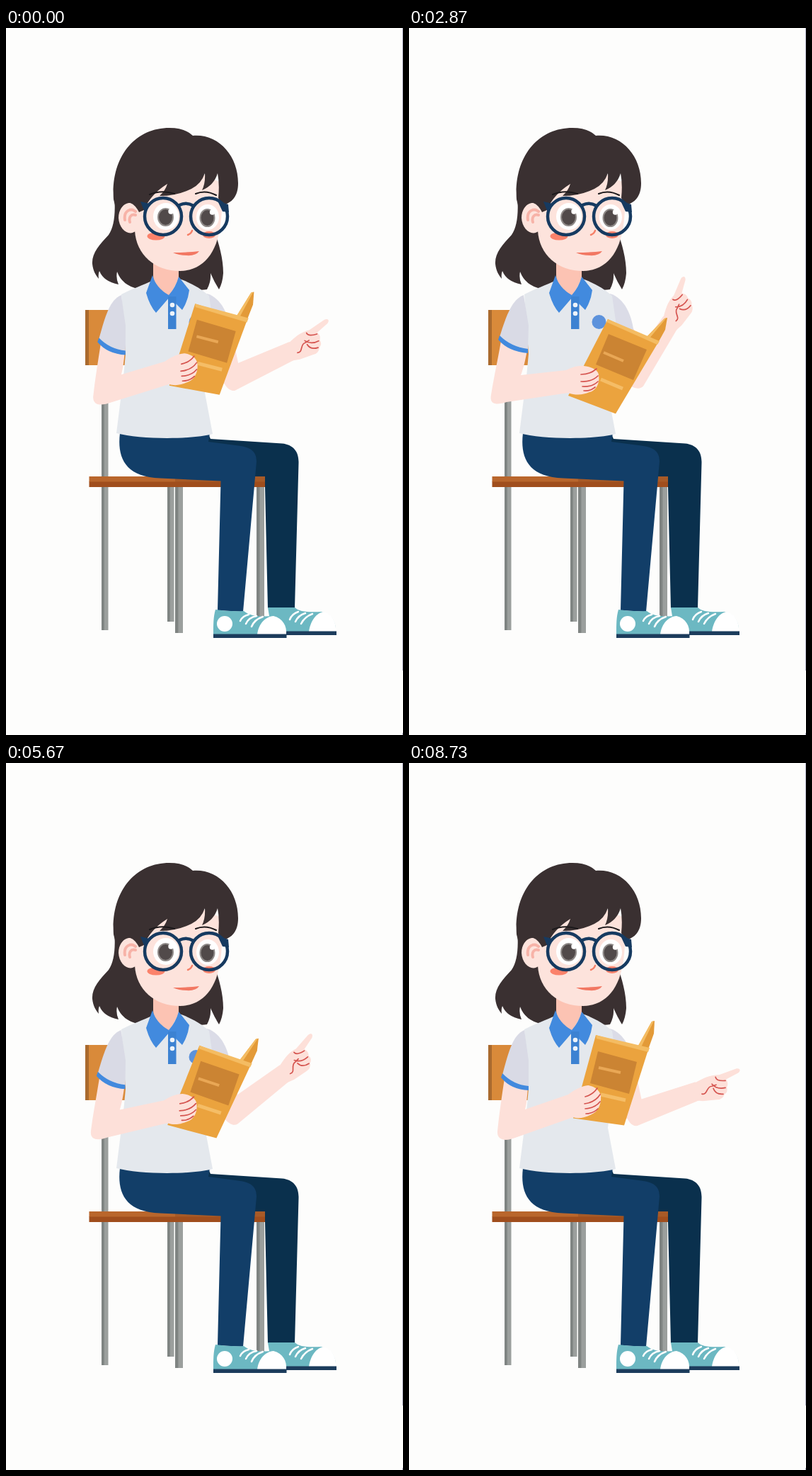
Animation, 561 px wide and 998 px high, one loop 8.76 s. Source, as an HTML page:

```html
<!DOCTYPE html>
<html lang="en">
<head>
<meta charset="utf-8">
<title>Reading girl</title>
<style>
html, body { margin: 0; width: 100%; height: 100%; overflow: hidden; background: #fdfdfc; }
svg { display: block; width: 100%; height: 100%; }
.line { fill: none; stroke-linecap: round; stroke-linejoin: round; }
</style>
</head>
<body>
<svg viewBox="0 0 561 998">
  <defs>
    <linearGradient id="metal"><stop offset=".35" stop-color="#7f8482"/><stop offset=".45" stop-color="#9b9f9d"/></linearGradient>
  </defs>
  <rect width="561" height="998" fill="#fdfdfc"/>
  <path d="M560 0H561V907H560ZM560 995H561V998H560Z" fill="#b4b3c8"/>

  <g id="chair">
    <rect x="135" y="470" width="9.5" height="380" fill="url(#metal)"/>
    <rect x="112" y="398" width="62" height="78" fill="#d98a3a"/>
    <rect x="112" y="398" width="5" height="78" fill="#a96a2e"/>
    <rect x="228" y="646" width="9.5" height="192" fill="url(#metal)"/>
    <rect x="239" y="646" width="11" height="208" fill="url(#metal)"/>
    <rect x="354" y="646" width="11" height="186" fill="url(#metal)"/>
  </g>

  <g id="backLeg">
    <path d="M286 573L289 580L390 586.500C406 588 414 598 413.500 614L408 819H370L366 648L340 630L250 590Z" fill="#0a304d"/>
    <path d="M370 818H408C414 824 426 825 446 824C460 826 467 840 466 852H392L372 830Z" fill="#6cb8c2"/>
    <path d="M428 852C430 837 439 825 449 824C461 827 467 840 466 852Z" fill="#fff"/>
    <path class="line" d="M401 835Q404 827 413 824M409 838Q413 829 423 826M417 841Q422 831 433 827" stroke="#fff" stroke-width="2.500"/>
    <rect x="394" y="851.500" width="73" height="5.500" fill="#1c3c5c"/>
  </g>

  <rect x="117.500" y="633" width="248.500" height="8" fill="#b9662c"/>
  <rect x="239" y="633" width="127" height="8" fill="#a75a27"/>
  <rect x="117.500" y="640.500" width="248.500" height="7.500" fill="#a04e1d"/>

  <g id="frontLeg">
    <path d="M161 572C157 605 167 634 218 635.500L303.500 639.500L299 822L335 824L354 612C354 596 344 591 324 589L286 584L288 572Z" fill="#123e68"/>
    <path d="M296 821Q316 824 336 823C346 831 360 831 379 830C391 833 397 844 396 856H293C293 842 293 831 296 821Z" fill="#6cb8c2"/>
    <path d="M355 856C357 841 366 831 378 830C391 833 397 844 396 856Z" fill="#fff"/>
    <circle cx="309" cy="841" r="11" fill="#fff"/>
    <path class="line" d="M331 837Q334 830 343 828M339 841Q343 832 354 830M347 845Q351 835 363 831" stroke="#fff" stroke-width="2.500"/>
    <rect x="293" y="855.500" width="103.500" height="5.500" fill="#1c3c5c"/>
  </g>

  <path id="hairBack" d="M153 235C155 262 153 280 145 292C132 306 121 318 122 333C123 343 127 349 131 354Q130 347 132 343Q138 358 159 362Q155 353 157 344Q164 363 186 368C198 369 206 365 212 361H250L262 368Q274 371 284 369Q290 358 289 346Q294 358 301 369Q306 360 307 346C307 325 301 305 294 285L180 225Z" fill="#3a3031"/>

  <path d="M300 415L318 425L333 496L304 503Z" fill="#fde0d9"/>
  <path d="M284 375C304 381 316 405 318 434L288 428Z" fill="#dbdce7"/>
  <path d="M163 376C178 368 194 363 208 356L245 354C262 360 276 368 287 378L293 420L281 515L292 573C262 581 190 581 156 572L166 492L169 460Z" fill="#e4e8ed"/>
  <path d="M208 328L244 336V354L230 380C215 374 208 362 208 349Z" fill="#fcc3b3"/>
  <path d="M207 349L198 374Q203 392 212 402L231 380L249 398Q257 386 259 370L244 351Q240 366 230 377Q212 367 207 349Z" fill="#428ade"/>
  <rect x="229" y="379" width="11.500" height="46" fill="#3c82d2"/>
  <circle cx="235" cy="391" r="3.300" fill="#eef4fa"/>
  <circle cx="235" cy="403" r="3.300" fill="#eef4fa"/>
  <circle cx="268.500" cy="415" r="10" fill="#5c92dc"/>

  <g id="head">
    <path d="M181 240L182 286C184 320 210 343 246 343C281 342 300 315 304 270L308 220L240 190Z" fill="#fde3dc"/>
    <path d="M185 250C172 241 159 252 159 268C160 285 174 295 184 286Z" fill="#fde3dc"/>
    <path class="line" d="M168 271C166 257 177 254 183 259M175 274C173 267 177 262 183 264" stroke="#f7b3a8" stroke-width="4"/>
    <ellipse cx="212" cy="294" rx="12.500" ry="5.500" fill="#fb826b"/>
    <ellipse cx="287" cy="292" rx="9" ry="5" fill="#fb826b"/>
    <path d="M152 242C148 182 182 141 231 141Q253 141 264 152C300 149 328 180 328 219C328 238 319 247 306 250L300 240Q302 220 299 205Q294 222 277 229Q282 219 281 205Q276 220 262 227Q241 237 217 237Q225 230 228 220Q204 235 195 257L188 260Q180 244 168 247Q161 250 158 266Z" fill="#3a3031"/>
    <path class="line" d="M203 235Q220 228 238 234M268 234Q282 228 297 236" stroke="#1c191b" stroke-width="2"/>
    <g fill="#fff"><ellipse cx="226" cy="266" rx="18" ry="19"/><ellipse cx="285" cy="267" rx="16" ry="18"/></g>
    <g fill="#514a4a" stroke="#8f8a88" stroke-width="2"><ellipse cx="225.500" cy="267" rx="10.500" ry="12"/><ellipse cx="284.500" cy="268" rx="10" ry="12"/></g>
    <g fill="#fff"><circle cx="233" cy="259" r="3.700"/><circle cx="291.500" cy="260" r="3.700"/></g>
    <g class="line" stroke="#163a60" stroke-width="4.500">
      <circle cx="222" cy="266" r="26"/><circle cx="287" cy="266" r="26"/>
      <path d="M245 250Q255 245 265 251"/>
    </g>
    <path d="M190 245L203 248L196 260ZM299 244L314 249L315 260L306 259Z" fill="#163a60"/>
    <path class="line" d="M263 286Q262 290 257 292" stroke="#f57f67" stroke-width="2.500"/>
    <path d="M236 317Q256 317 273 315Q268 322 255 321Q244 321 236 317Z" fill="#f27863"/>
  </g>

  <g id="forearm">
    <path d="M0 -17L98 -13V13L0 17C-13 16 -14 -14 0 -17Z" fill="#fde0d9"/>
  </g>
  <g id="hand">
    <path d="M-7 -10C6 -17 14 -22 28 -22L52 -31C58 -32 59 -28 55 -25L38 -16Q42 -10 39 -5Q41 2 36 5Q33 13 25 13L5 15L-6 14Z" fill="#fde0d9"/>
    <path class="line" d="M23 -19Q24 -13 37 -14M18 -9Q25 -1 37 -4M20 -3Q23 6 34 5M4 5C12 7 10 -6 18 -6L24 -8" stroke="#d5544f" stroke-width="1.700"/>
  </g>
  <g id="moving"></g>
</svg>
<script>
const LOOP = 8760, CYCLE = 3600;
const ELBOW = [317, 496], FOREARM = 99;
const byId = id => document.getElementById(id);
const mix = (a, b, p) => a + (b - a) * p;
const ease = x => (1 - Math.cos(Math.PI * Math.min(1, Math.max(0, x)))) / 2;

// Each shape blends from the arm-lowered outline to the arm-raised one.
const shapes = [
  ['#e39a38', 'M324 399L343 365L347 364L346 382L337 407Z', 'M335 437L361 410L365 409L362 426L351 446Z'],
  ['#f4bc62', 'M324 399L343 365L346 364L328 401Z', 'M335 437L361 410L364 409L339 439Z'],
  ['#eba33e', 'M264 384L338 405L304 511.5L232 501.5Z', 'M281 411L352 444L292 544.5L225 519Z'],
  ['#f4bc62', 'M264 384L340 402L338 408L265 389Z', 'M281 411L354 442L351 447L279 415Z'],
  ['#cb8433', 'M267 407L322 422L311 467L256 452Z', 'M282 432L336 454L317 497L264 475Z'],
  ['#e9a755', 'M268 430L299 437', 'M275 458L303 470', 4],
  ['#f5bd66', 'M271 468L306 476', 'M271 496L302 509', 5],
  ['#fde0d9',
    'M135 445L168 457C167 472 166 482 164 489L225 468C235 460 245 456 253 455C262 456 270 462 271 470C272 480 268 492 258 496C250 500 240 503 232 500L150 529C140 533 124 535 125 520C127 500 130 478 135 445Z',
    'M130 442L167 454C164 472 161 482 158 490L222 483C232 478 240 476 247 477C258 478 268 483 268 490C270 500 265 512 255 514C246 518 236 519 225 515L138 528C126 532 113 533 116 518C119 498 124 476 130 442Z'],
  ['#d5544f',
    'M249 471Q260 468 266 459M248 481Q263 479 270 468M249 488Q263 487 270 478M250 495Q260 495 267 488',
    'M243 489Q256 489 265 481M243 499Q258 500 267 491M245 506Q259 507 267 499M247 512Q256 513 263 507', 1.7],
  ['#d9dae5',
    'M163 377C147 384 141 406 132 440Q147 456 169 458L169 420Z',
    'M162 377C146 383 138 404 128 436Q144 452 168 455L169 420Z'],
  ['#428ade',
    'M132 438Q147 454 169 456L169 462Q144 461 130 444Z',
    'M128 434Q144 450 168 453L168 459Q141 457 126 440Z']
];

const blend = (low, high, p) => {
  const ends = high.match(/[\d.]+/g);
  let i = 0;
  return low.replace(/[\d.]+/g, n => mix(+n, +ends[i++], p).toFixed(2));
};

const paths = shapes.map(([color, , , width]) => {
  const path = document.createElementNS('http://www.w3.org/2000/svg', 'path');
  path.setAttribute(width ? 'stroke' : 'fill', color);
  if (width) {
    path.setAttribute('class', 'line');
    path.setAttribute('stroke-width', width);
    if (width > 2) path.style.strokeLinecap = 'butt';
  }
  return byId('moving').appendChild(path);
});

// Wrist bend in degrees: two downward wags while the arm is lowered.
const wag = [[0, -17], [60, -18], [380, 8], [740, -19], [1260, 8], [1740, -18], [1880, -20], [2280, -18], [CYCLE, -17]];

function keyed(keys, t) {
  const i = keys.findIndex(k => k[0] > t);
  const [t0, a] = keys[i - 1], [t1, b] = keys[i];
  return mix(a, b, ease((t - t0) / (t1 - t0)));
}

// How far something is raised; "hold" lengthens the raised time at both ends.
function raised(t, hold) {
  if (t < 1000) t += CYCLE;
  return ease((t - 1886 + hold) / 386) - ease((t - 3306 - hold) / 386);
}

function draw(time) {
  const t = time % LOOP % CYCLE;
  const book = raised(t, 20);
  const arm = mix(-20, -57, raised(t, 0));
  const rad = arm * Math.PI / 180;
  const x = ELBOW[0] + FOREARM * Math.cos(rad);
  const y = ELBOW[1] + FOREARM * Math.sin(rad);
  byId('forearm').setAttribute('transform', `translate(${ELBOW}) rotate(${arm})`);
  byId('hand').setAttribute('transform', `translate(${x} ${y}) rotate(${arm + keyed(wag, t) + 28})`);
  paths.forEach((path, i) => path.setAttribute('d', blend(shapes[i][1], shapes[i][2], book)));
}

const start = performance.now();
function tick() {
  draw(performance.now() - start);
  requestAnimationFrame(tick);
}
tick();
</script>
</body>
</html>
```
